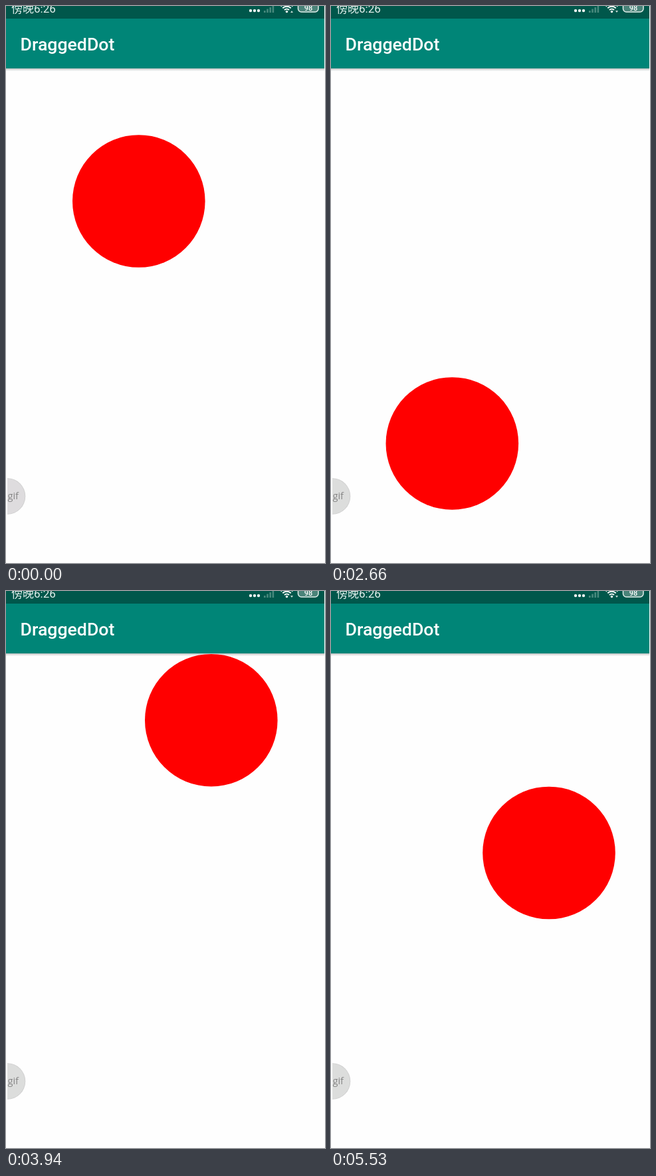
An HTML page with a canvas that plays this animation: 480x839 px, repeating every 6.3 s.

```html
<!DOCTYPE html>
<html lang="en">
<head>
<meta charset="utf-8">
<title>Dragged circle</title>
<style>
  html, body { margin: 0; width: 100%; height: 100%; overflow: hidden; background: #fefefe; }
  canvas { display: block; width: 480px; height: 839px; }
</style>
</head>
<body>
<canvas id="stage" width="480" height="839"></canvas>
<script>
const ctx = document.getElementById('stage').getContext('2d');
const WIDTH = 479, HEIGHT = 839, BAR_BOTTOM = 94;
const LOOP = 6300, DRAG_START = 1380, STEP = 98.3, RADIUS = 99.8;
const REST = { x: 199.8, y: 294 };

// Turning points of the drag; step counts the touch updates.
const keys = [
  [0, 194.4, 297.3], [4, 91, 470], [6, 118, 611], [7, 220, 709], [8, 316, 670.5],
  [9, 385, 530], [10, 280, 365], [12, 128, 570], [14, 260, 690], [16, 295, 432],
  [18, 201, 433], [20, 118, 553], [23, 90, 380], [26, 308.8, 194.7], [28, 405, 350],
  [30, 365, 568], [32, 188.3, 679], [34, 252, 439], [36, 328, 331], [42, 328, 394.5]
].map(([step, x, y]) => ({ step, x, y }));

function slope(i, axis) {
  const a = keys[Math.max(i - 1, 0)];
  const b = keys[Math.min(i + 1, keys.length - 1)];
  return (b[axis] - a[axis]) / (b.step - a.step);
}

// Cubic Hermite curve through the turning points.
function curve(step, axis) {
  const i = Math.max(1, keys.findIndex(k => k.step >= step));
  const a = keys[i - 1], b = keys[i], span = b.step - a.step;
  const u = (step - a.step) / span, v = 1 - u;
  return a[axis] * v * v * (1 + 2 * u) + b[axis] * u * u * (1 + 2 * v)
    + span * u * v * (slope(i - 1, axis) * v - slope(i, axis) * u);
}

function centreAt(t) {
  if (t < DRAG_START) return REST;
  const step = Math.min(Math.floor((t - DRAG_START) / STEP), keys[keys.length - 1].step);
  return { x: curve(step, 'x'), y: curve(step, 'y') };
}

function disc(x, y, r, color) {
  ctx.fillStyle = color;
  ctx.beginPath();
  ctx.arc(x, y, r, 0, Math.PI * 2);
  ctx.fill();
}

function rect(x, y, w, h, color) {
  ctx.fillStyle = color;
  ctx.fillRect(x, y, w, h);
}

function label(text, x, y, font, color, align = 'left') {
  ctx.font = font;
  ctx.fillStyle = color;
  ctx.textAlign = align;
  ctx.fillText(text, x, y);
}

function clipped(x, y, w, h, paint) {
  ctx.save();
  ctx.beginPath();
  ctx.rect(x, y, w, h);
  ctx.clip();
  paint();
  ctx.restore();
}

function drawWifi(t) {
  const x = 422.5, y = 9.5;
  ctx.strokeStyle = '#f2f7f5';
  ctx.lineWidth = 2;
  for (let r = 5; r < 13; r += 3.8) {
    ctx.beginPath();
    ctx.arc(x, y, r, -Math.PI * 0.75, -Math.PI * 0.25);
    ctx.stroke();
  }
  disc(x, y - 1, 1.8, '#f2f7f5');
  const [base, tip] = t < 280 ? [10, 7] : [7, 10];
  ctx.fillStyle = '#c3d8d2';
  ctx.beginPath();
  ctx.moveTo(428, base);
  ctx.lineTo(432, base);
  ctx.lineTo(430, tip);
  ctx.fill();
}

function drawBattery() {
  ctx.fillStyle = '#4a8379';
  ctx.strokeStyle = '#e4efec';
  ctx.lineWidth = 1.5;
  ctx.beginPath();
  ctx.roundRect(439.5, -6, 30.5, 15, 5);
  ctx.fill();
  ctx.stroke();
  label('98', 455, 6.5, '500 11px Roboto, sans-serif', '#ffffff', 'center');
}

function drawStatusBar(t) {
  rect(0, 0, WIDTH, 19, '#00574b');
  label('傍晚6:26', 8, 10, '17px Roboto, "Noto Sans CJK SC", "Noto Sans CJK", sans-serif', '#e6f0ed');
  for (let i = 0; i < 3; i++) {
    disc(368 + i * 6, 7, 2.2, '#f2f7f5');
  }
  for (let i = 0; i < 4; i++) {
    const h = 3 + i * 2.5;
    rect(388 + i * 4.2, 10 - h, 2.6, h, '#47887c');
  }
  drawWifi(t);
  drawBattery();
}

function drawToolbar() {
  const shadow = ctx.createLinearGradient(0, BAR_BOTTOM, 0, BAR_BOTTOM + 4);
  shadow.addColorStop(0, 'rgba(0,0,0,.24)');
  shadow.addColorStop(1, 'rgba(0,0,0,0)');
  rect(0, BAR_BOTTOM, WIDTH, 4, shadow);
  rect(0, 19, WIDTH, BAR_BOTTOM - 19, '#008577');
  label('DraggedDot', 21.5, 67, '500 26.67px Roboto, sans-serif', '#ffffff');
}

function drawBadge(t) {
  disc(2, 738.5, 27.3, '#cfcfcf');
  disc(2, 738.5, 26.4, t < 100 ? '#dedcde' : '#dcdddc');
  label('gif', 2.5, 743, '14.5px "Open Sans", sans-serif', '#858585');
}

function draw(t) {
  rect(0, 0, 480, HEIGHT, '#fefefe');
  clipped(2, 700, 40, 80, () => drawBadge(t));
  drawToolbar();
  drawStatusBar(t);
  const { x, y } = centreAt(t);
  clipped(0, BAR_BOTTOM, WIDTH, HEIGHT - BAR_BOTTOM, () => disc(x, y, RADIUS, '#ff0000'));
}

const start = performance.now();
function tick() {
  draw((performance.now() - start) % LOOP);
  requestAnimationFrame(tick);
}
tick();
</script>
</body>
</html>
```
